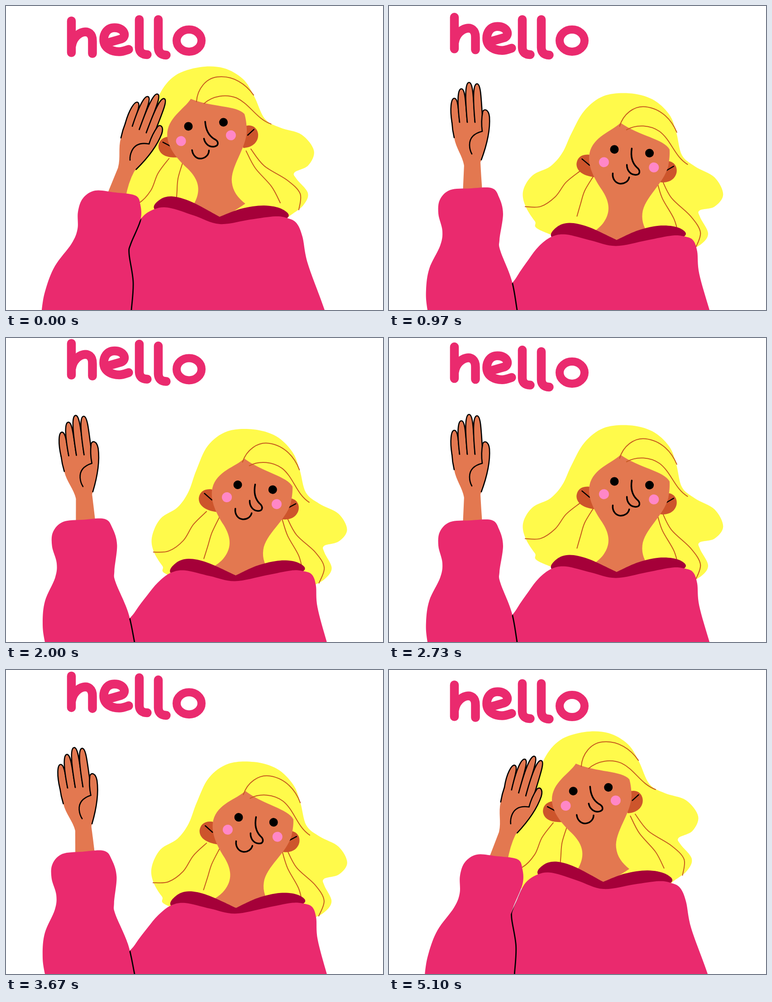
An HTML page with a canvas for the animation above (5130 ms loop, 833 px wide and 672 px high).

```html
<!DOCTYPE html>
<html lang="en">
<head>
<meta charset="utf-8">
<title>hello</title>
<style>
html, body { margin: 0; width: 100%; height: 100%; overflow: hidden; background: #fff; }
canvas { display: block; }
</style>
</head>
<body>
<canvas id="stage" width="833" height="672" role="img" aria-label="hello"></canvas>
<script>
const ctx = document.getElementById('stage').getContext('2d');
const LOOP = 5130, WAVE = LOOP / 3, BOUNCE = LOOP / 6;
const PINK = '#ea2a6e', WINE = '#a50039', YELLOW = '#fffa4b', SKIN = '#e37850',
      EAR = '#cd552c', STRAND = '#c65a1e', BLUSH = '#ff87c7', INK = '#000';

const points = s => s.trim().split(/\s+/).map(xy => xy.split(',').map(Number));
const lerp = (a, b, k) => a + (b - a) * k;
const clamp = v => Math.min(1, Math.max(0, v));
const span = (t, a, b) => clamp((t - a) / (b - a));
const ease = k => (1 - Math.cos(Math.PI * k)) / 2;

// Head parts are drawn upright, torso and sleeve with the arm near the head.
const hair = points(`330,492 300,468 275,435 268,403 285,367 322,342 345,308 360,262 383,207 422,170 478,158
  530,166 570,195 590,234 608,285 640,308 685,328 708,365 692,395 660,407 663,422 684,455 672,480 640,500 560,540`);
const strands = [
  '388,346 360,375 340,410 310,435 276,439',
  '418,356 403,390 397,420 392,448',
  '559,349 575,388 606,432 621,470',
  '570,346 595,385 642,422 667,455 660,490'
].map(points);
const collar = points(`328,449 340,428 368,421 410,433 472,466 472,466 520,448 570,441 610,449 622,468
  560,490 472,500 370,475`);
const torso = points(`245,620 262,555 282,505 300,468 328,449 360,446 415,463 472,482 540,472 595,465 622,469
  642,480 655,510 667,570 704,672 730,760 240,760`);
const sleeve = points(`72,760 79,672 88,625 108,575 145,525 158,493 159,455 170,425 197,408 240,412 286,419
  297,440 297,474 276,525 272,548 281,610 277,672 268,760`);

const face = new Path2D(`M457 226C440 247 400 262 396 300C394 325 408 350 432 378C450 400 455 420 447 440
  C441 455 433 464 415 478L490 500 550 470C535 455 526 440 526 420C526 385 566 350 572 310C573 295 573 285 571 273
  C557 252 500 250 457 226Z`);
const ears = new Path2D(`M398 303C380 303 372 313 372 326C374 345 395 351 415 351L420 320Z
  M570 299C590 297 597 315 593 327C588 343 572 348 558 347L550 320Z`);
const earLines = new Path2D('M383 314L401 326M586 309L571 320');
const bangs = new Path2D(`M463 233C468 205 490 184 515 184C550 184 576 207 590 233
  M479 239C500 224 530 223 552 235C580 252 590 286 621 301`);
const features = new Path2D(`M485 280C484 300 490 312 500 320C510 326 510 336 499 337C487 338 479 328 478 317
  M449 339C449 352 458 360 467 360C477 360 485 353 486 344`);

const palm = new Path2D('M139 256Q140 274 144 291C148 315 162 330 166 353L200 351 204 340 210 256Z');
const palmEdge = new Path2D('M139 256Q140 274 144 291');
const thumb = new Path2D(`M206 277Q203 255 207 234C210 226 220 228 222 245C224 275 217 305 204 340`);
const palmLine = new Path2D('M206 277Q178 284 178 307Q178 318 183 327');
const fingertips = points('144.5,204 160,183 177,169 194.5,172');

const letters = [
  ['M144.5 33V103M145 88C150 55 192 44 191 78V105', 1],
  ['M226 81L254 73C268 68 262 48 240 48C222 48 216 63 216 74C216 94 235 101 250 101C258 101 265 98 271 96', 5],
  ['M294.5 30V92Q295 107 312 107.5', 10],
  ['M336.5 30V92Q337 108 354 108.5', 14],
  ['M377 76.5a27.5 24.5 0 1 0 55 0a27.5 24.5 0 1 0 -55 0Z', 15]
].map(([d, drop]) => ({ path: new Path2D(d), drop }));

// Smooth curve through the points; a repeated point makes a corner.
function spline(pts, closed) {
  const path = new Path2D(), n = pts.length;
  const at = i => pts[closed ? (i + n) % n : Math.min(n - 1, Math.max(0, i))];
  path.moveTo(...at(0));
  for (let i = 0; i < (closed ? n : n - 1); i++) {
    const [a, b, c, d] = [at(i - 1), at(i), at(i + 1), at(i + 2)];
    path.bezierCurveTo(b[0] + (c[0] - a[0]) / 6, b[1] + (c[1] - a[1]) / 6,
      c[0] - (d[0] - b[0]) / 6, c[1] - (d[1] - b[1]) / 6, ...c);
  }
  return path;
}

function fill(path, color) {
  ctx.fillStyle = color;
  ctx.fill(path);
}

function stroke(path, color, width) {
  ctx.strokeStyle = color;
  ctx.lineWidth = width;
  ctx.stroke(path);
}

function dot(x, y, r, color) {
  const path = new Path2D();
  path.arc(x, y, r, 0, 7);
  fill(path, color);
}

// Maps a point of a part to the stage: pivot goes to (x, y), turned by deg.
function placing(x, y, deg, [px, py]) {
  const c = Math.cos(deg * Math.PI / 180), s = Math.sin(deg * Math.PI / 180);
  return {
    map: ([u, v]) => [x + (u - px) * c - (v - py) * s, y + (u - px) * s + (v - py) * c],
    run(draw, shift = 0) {
      ctx.save();
      ctx.translate(x + shift, y);
      ctx.rotate(deg * Math.PI / 180);
      ctx.translate(-px, -py);
      draw();
      ctx.restore();
    }
  };
}

// 0: arm near the head, 1: arm held out, with a small overshoot on the way
function swing(t) {
  if (t < 265) return 1.18 * ease(span(t, 40, 265));
  if (t < 1287) return 1 + 0.18 * (1 - span(t, 265, 540)) ** 2;
  return 1 - ease(span(t, 1287, 1742));
}

// Each letter jumps a little later than the one before, sinks below its line and recovers.
function lift(drop, i, t) {
  const u = t - 45 * i;
  const rise = -21 * (1 - (1 - span(u, 50, 285)) ** 1.5);
  return lerp(rise, drop * (1 - span(t, 710, 720 + 34 * i)), ease(span(u, 290, 510)));
}

function drawText(t) {
  letters.forEach(({ path, drop }, i) => {
    ctx.save();
    ctx.translate(0, lift(drop, i, t));
    stroke(path, PINK, i == 4 ? 18 : 19.5);
    ctx.restore();
  });
}

function drawHead(p, bow, sway) {
  const head = placing(lerp(403, 498, p), lerp(266, 317, p) - 14 * bow, -6.6 + 12.6 * p, [447, 286]);
  const turn = 0.45 - p;   // parts further back follow less
  const hang = ([x, y]) => {
    const [hx, hy] = head.map([x, y]);
    const low = span(y, 200, 400), side = (x - 480) / 200;
    return [hx + 20 * turn + sway * low * (14 - 4 * side),
            hy + low * (14 * turn + sway * (12 - 18 * side))];
  };

  fill(spline(hair.map(hang), true), YELLOW);
  for (const s of strands) stroke(spline(s.map(hang)), STRAND, 2);
  head.run(() => {
    fill(ears, EAR);
    stroke(earLines, INK, 2.5);
  }, 9 * turn);
  head.run(() => fill(face, SKIN), 5 * turn);
  head.run(() => stroke(bangs, STRAND, 2), 18 * turn);
  head.run(() => {
    for (const x of [447, 525]) dot(x, 286, 9.5, INK);
    for (const x of [427, 538]) dot(x, 316.5, 11, BLUSH);
    stroke(features, INK, 3.5);
  });
}

function drawFinger([x, y], i, flex) {
  const base = 139 + 17 * i;
  x += flex;
  const finger = new Path2D(`M${base} 257C${x - 10} ${y + 25} ${x - 8} ${y} ${x} ${y}
    C${x + 8} ${y} ${x + 9} ${y + 25} ${base + 17} 257`);
  fill(finger, SKIN);
  stroke(finger, INK, 2.6);
}

function drawHand(p, bow, flex, onSleeve) {
  const hand = placing(316 - 110 * p - 44 * bow, 305 - 28 * Math.min(p, 1) - 26 * bow,
    25 * (1 - p) - 31 * bow, [206, 277]);
  const arm = new Path2D();
  arm.moveTo(...hand.map([166, 350]));
  arm.lineTo(...onSleeve([222, 420]));
  arm.lineTo(...onSleeve([264, 425]));
  arm.quadraticCurveTo(...onSleeve([270, 390]), ...hand.map([202, 345]));
  fill(arm, SKIN);
  hand.run(() => {
    fill(palm, SKIN);
    stroke(palmEdge, INK, 2.6);
    fingertips.forEach((tip, i) => drawFinger(tip, i, flex));
    fill(thumb, SKIN);
    stroke(thumb, INK, 2.6);
    stroke(palmLine, INK, 2.6);
  });
}

function draw(time) {
  const t = time % WAVE, p = swing(t);
  const bow = p * Math.max(0, 1 - p);
  const sway = ease(span(t, 100, 290)) * (1 - ease(span(t, 330, 560)));
  const flex = (t > 1287 ? -60 : 60) * bow;

  // the torso leans from the waist, the sleeve from the elbow
  const onTorso = ([x, y]) => {
    const k = 0.2 + 0.8 * span(y, 672, 468);
    return [x + 31 * p * k, y + p * k * (51 - 0.07 * (x - 475))];
  };
  const onSleeve = ([x, y]) => {
    const k = (672 - y) / 264;
    return [x + p * (6 - 68 * k), y - 0.18 * p * k * (x - 190)];
  };

  ctx.fillStyle = '#fff';
  ctx.fillRect(0, 0, 833, 672);
  ctx.lineCap = ctx.lineJoin = 'round';
  drawText(time % BOUNCE);
  drawHead(p, bow, sway);

  const front = spline(torso.map(onTorso), true), arm = spline(sleeve.map(onSleeve), true);
  fill(spline(collar.map(onTorso), true), WINE);
  fill(front, PINK);
  drawHand(p, bow, flex, onSleeve);
  fill(arm, PINK);
  // the seam shows only where the sleeve lies over the torso
  ctx.save();
  ctx.clip(front);
  stroke(arm, INK, 2.8);
  ctx.restore();
}

const start = performance.now();
function tick() {
  draw((performance.now() - start) % LOOP);
  requestAnimationFrame(tick);
}
tick();
</script>
</body>
</html>
```
